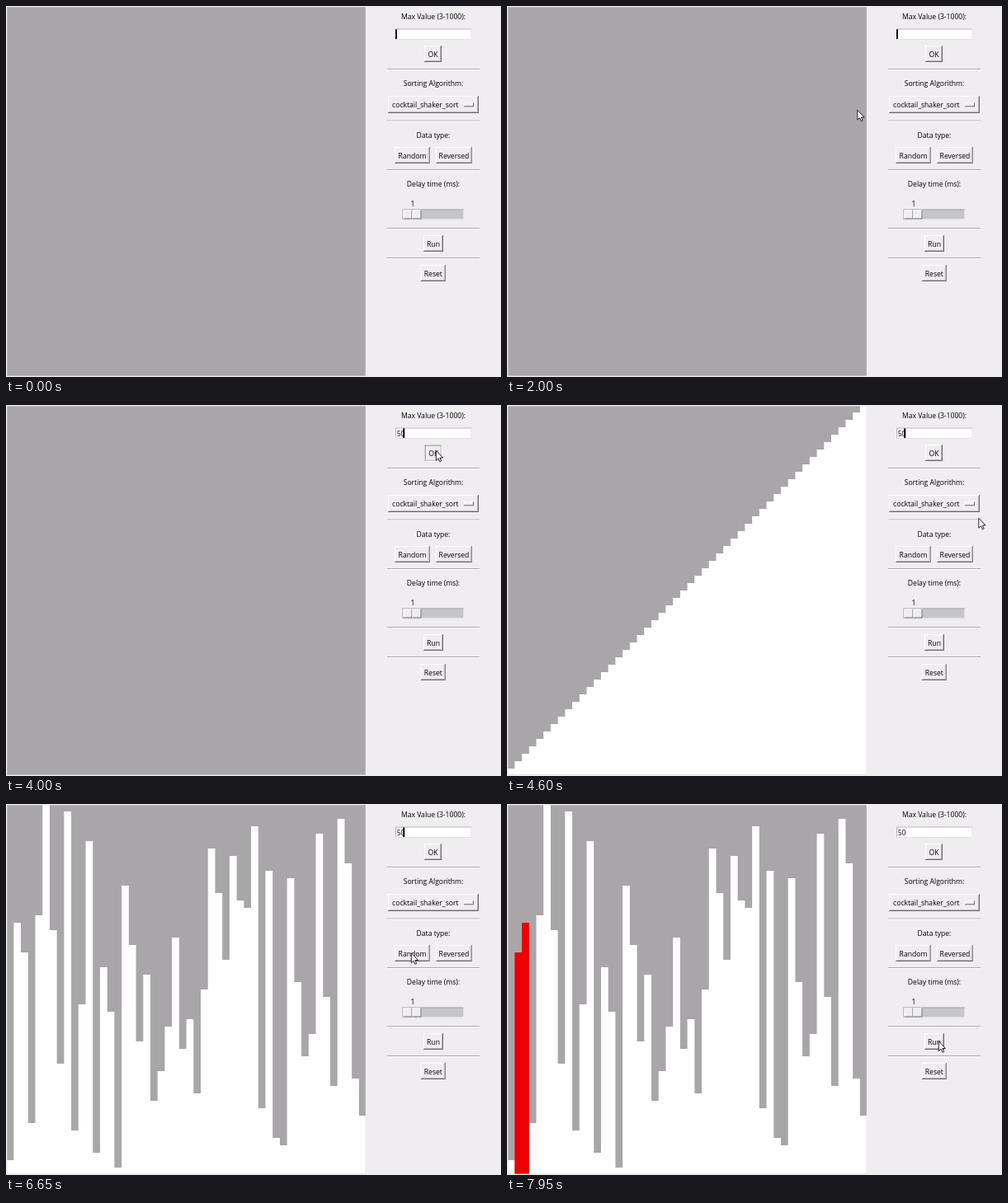
Recreate the animation shown at these times as an HTML page. Size 600x450 px, loop 8 s.

```html
<!DOCTYPE html>
<html lang="en">
<head>
<meta charset="utf-8">
<title>Sorting visualizer</title>
<style>
html, body { margin: 0; width: 100%; height: 100%; overflow: hidden; background: #efedef; }
svg { display: block; width: 600px; height: 450px; }
text { font: 8.6px "Open Sans", "Noto Sans", sans-serif; fill: #000; white-space: pre; }
</style>
</head>
<body>
<svg id="stage" viewBox="0 0 600 450"></svg>
<script>
const LOOP = 8000, STEP = 50, COUNT = 50;
const MID = 518;
const FACE = '#efedef', LIGHT = '#fff', SHADE = '#a9a8aa', DARK = '#6b6a6c';
const stage = document.getElementById('stage');

function add(tag, attrs, parent = stage) {
  const el = document.createElementNS('http://www.w3.org/2000/svg', tag);
  for (const k in attrs) el.setAttribute(k, attrs[k]);
  parent.appendChild(el);
  return el;
}
const box = (x, y, width, height, fill, parent) =>
  add('rect', { x, y, width, height, fill }, parent);
function label(s, x, y, anchor = 'middle', parent = stage) {
  const el = add('text', { x, y, 'text-anchor': anchor }, parent);
  el.textContent = s;
  return el;
}
// A filled panel with one colour on its top-left edges, another on the rest.
function panel(x, y, w, h, fill, topLeft, bottomRight, parent) {
  box(x, y, w, h, fill, parent);
  return [
    add('path', { d: `M${x} ${y + h}V${y}H${x + w}v1H${x + 1}V${y + h}z`, fill: topLeft }, parent),
    add('path', { d: `M${x + w} ${y}V${y + h}H${x}v-1H${x + w - 1}V${y}z`, fill: bottomRight }, parent)
  ];
}
// Returns a function that pushes the button in or lets it out.
function button(s, mid, y, w, h = 20) {
  const g = add('g', {}), x = mid - w / 2;
  const [a, b] = panel(x, y, w, h, FACE, LIGHT, DARK, g);
  panel(x + 1, y + 1, w - 2, h - 2, FACE, FACE, '#b8b7b9', g);
  label(s, mid, y + h / 2 + 3.5, 'middle', g);
  return down => {
    a.setAttribute('fill', down ? DARK : LIGHT);
    b.setAttribute('fill', down ? LIGHT : DARK);
    g.setAttribute('transform', down ? 'translate(.8 .8)' : '');
  };
}
function separator(y) {
  box(462, y, 112, 1, SHADE);
  box(462, y + 1, 112, 1, LIGHT);
}

// Chart area
box(0, 0, 600, 450, FACE);
box(1.3, 1.3, 434.5, 447.3, '#a8a6a8');
const bars = add('path', { fill: '#fff' });
const marked = add('path', { fill: '#ee0000' });

// Control panel
label('Max Value (3-1000):', MID, 15.7);
panel(472, 27.4, 92.5, 13.6, '#fff', '#b4b3b5', '#e2e1e3');
const entry = label('', 473.7, 37.8, 'start');
const caret = box(472, 28.4, 2, 11.6, '#000');
const pressOK = button('OK', 517.5, 48, 21);
separator(76);

label('Sorting Algorithm:', MID, 96.6);
button('cocktail_shaker_sort', MID, 109, 110, 21).call();
stage.lastChild.lastChild.setAttribute('x', 508.3);
panel(555, 117.3, 12, 5, FACE, LIGHT, DARK);
separator(138.6);

label('Data type:', MID, 159.6);
const pressRandom = button('Random', 492.5, 171, 42.5);
button('Reversed', 543, 171, 43.5);
separator(198);

label('Delay time (ms):', MID, 218.6);
label('1', 493, 243.4);
panel(480.5, 246.6, 75, 13, '#c6c5c7', SHADE, LIGHT);
for (const x of [481.5, 492.5]) panel(x, 247.6, 11, 11, FACE, LIGHT, DARK);
separator(269);

const pressRun = button('Run', MID, 278, 24);
separator(305);
button('Reset', 517.8, 314, 30);

const pointer = add('path', {
  fill: '#fff', stroke: '#111', 'stroke-width': .9,
  d: 'M.3 .3V12.2L3 9.7L4.9 13.8L6.7 13L4.9 9H8.6z'
});

// The values being sorted, before and after the first swap
const ordered = Array.from({ length: COUNT }, (_, i) => i + 1);
const shuffled = [2, 34, 30, 7, 35, 50, 33, 15, 49, 6, 23, 45, 3, 28, 22, 1, 39,
  31, 18, 27, 10, 14, 20, 32, 17, 21, 11, 25, 44, 38, 29, 43, 37, 36, 47, 9, 41,
  5, 4, 40, 26, 16, 19, 46, 24, 12, 48, 42, 13, 8];
const swapped = shuffled.slice();
[swapped[1], swapped[2]] = [swapped[2], swapped[1]];

const edge = i => Math.min(435.8, Math.max(1.3, .6 + i * 8.72));
const barPath = (data, keep = () => true) => data.map((v, i) => keep(i)
  ? `M${edge(i)} 448.6V${Math.max(1.3, 450 - 9 * v)}H${edge(i + 1)}V448.6z` : '').join('');
const isMarked = i => i === 1 || i === 2;
const views = [
  ['', ''],
  [barPath(ordered), ''],
  [barPath(shuffled), ''],
  [barPath(swapped, i => !isMarked(i)), barPath(swapped, isMarked)]
];

// Pointer stops: arrival time, x, y. Each glide lasts at most GLIDE ms.
const GLIDE = 500;
const stops = [
  [1100, 175, 142], [1450, 505, 80], [1800, 470, 306], [2000, 424.5, 126],
  [2400, 516, 107], [2700, 521, 55], [4600, 571.5, 137], [5100, 552, 124],
  [6050, 502.5, 197], [6400, 491, 180.5], [7700, 523, 287.5]
];
const ease = p => p * p * (3 - 2 * p);
function pointerAt(t) {
  let [, x, y] = stops[0];
  stops.slice(1).forEach(([at, nx, ny], i) => {
    const span = Math.min(GLIDE, at - stops[i][0]);
    const p = ease(Math.min(1, Math.max(0, (t - at + span) / span)));
    x += (nx - x) * p;
    y += (ny - y) * p;
  });
  return [x, y];
}

const passed = (t, ...times) => times.filter(at => t >= at).length;
const between = (t, a, b) => t >= a && t < b;
const show = (el, on) => el.setAttribute('visibility', on ? 'visible' : 'hidden');

function draw(now) {
  const t = Math.floor((now % LOOP) / STEP) * STEP;
  const [plain, red] = views[passed(t, 4050, 6550, 7950)];
  bars.setAttribute('d', plain);
  marked.setAttribute('d', red);

  const typed = passed(t, 3150, 3400);
  entry.textContent = '50'.slice(0, typed);
  caret.setAttribute('x', 472 + 4.6 * typed);
  // The caret is off for 300 ms in every cycle.
  show(caret, t < 450 || (t - 450) % 906 >= 300);

  pressOK(between(t, 3900, 4050));
  pressRandom(between(t, 6450, 6550));
  pressRun(between(t, 7800, 7900));

  show(pointer, t >= stops[0][0]);
  pointer.setAttribute('transform', `translate(${pointerAt(t)})`);
}

const start = performance.now();
function tick() {
  draw(performance.now() - start);
  requestAnimationFrame(tick);
}
tick();
</script>
</body>
</html>
```
